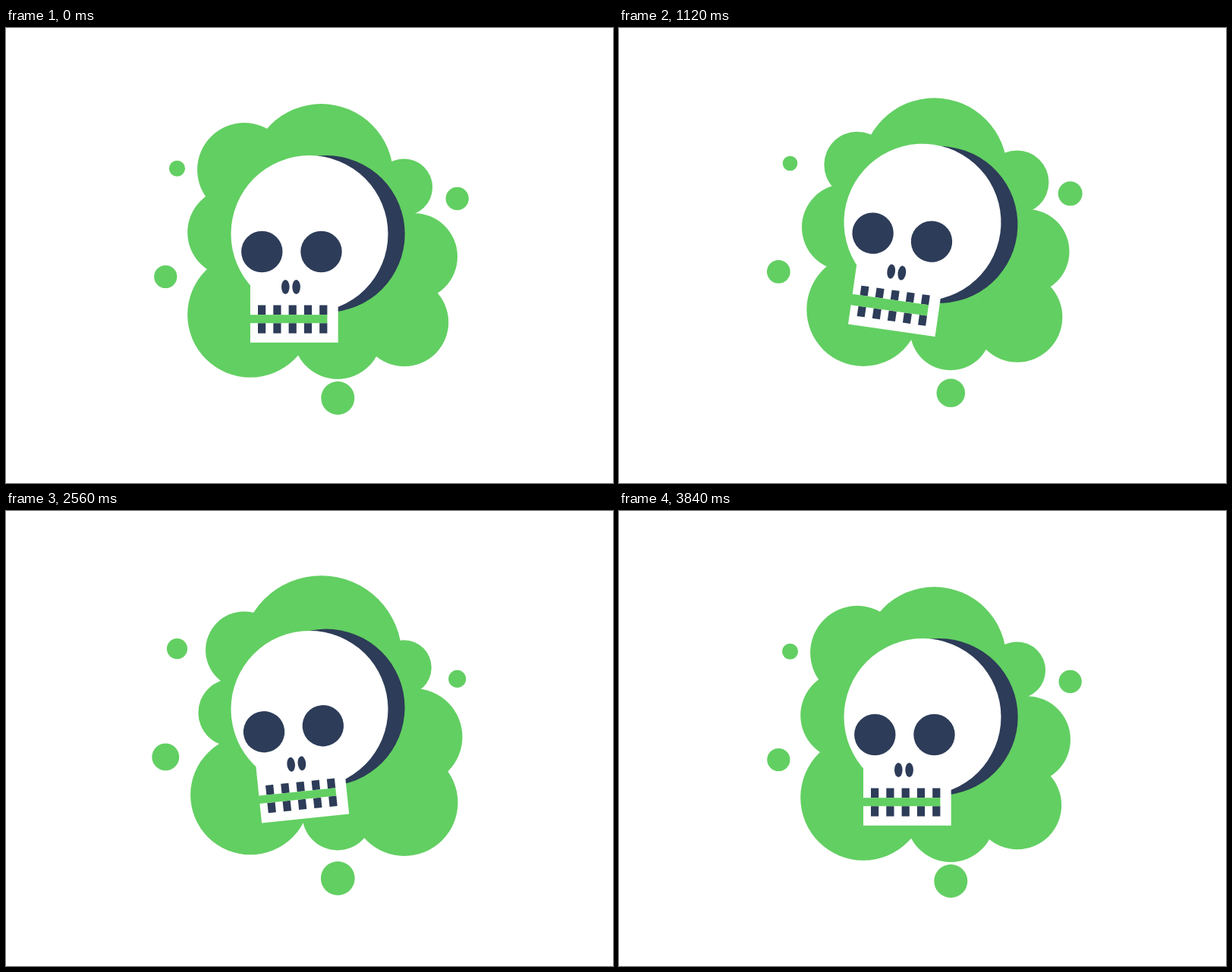
Animation, 800 px wide and 600 px high, one loop 3.88 s. Source, as an HTML page with a canvas:

```html
<!DOCTYPE html>
<html lang="en">
<head>
<meta charset="utf-8">
<title>Skull in a toxic cloud</title>
<style>
  html, body { margin: 0; width: 100%; height: 100%; overflow: hidden; background: #fff; }
  canvas { display: block; }
</style>
</head>
<body>
<canvas id="stage" width="800" height="600"></canvas>
<script>
const ctx = document.getElementById('stage').getContext('2d');
const GREEN = '#62cf62', DARK = '#2d3c58', WHITE = '#fff';
const STEP = 40, FRAMES = 97, BEAT = 48;

// Key poses of the skull, [time, value], eased in and out
const LIFT = [[0, 0], [25, -17.5], [46, 22.5], [73, -21.5], [96, 0]];
const TILT = [[0, 0], [16, -5.9], [25.5, 10.1], [38, -8.9], [48, 0]];
const GAP = [[0, 11], [8, 7], [25, 14.6], [39, 14.2], [48, 11]];

function ease(keys, t) {
  let i = 1;
  while (i < keys.length - 1 && t > keys[i][0]) i++;
  const [t0, a] = keys[i - 1], [t1, b] = keys[i];
  const u = (t - t0) / (t1 - t0);
  return a + (b - a) * u * u * (3 - 2 * u);
}

function oval(x, y, rx, ry, color) {
  ctx.fillStyle = color;
  ctx.beginPath();
  ctx.ellipse(x, y, rx, ry, 0, 0, Math.PI * 2);
  ctx.fill();
}

const disc = (x, y, r, color) => oval(x, y, r, r, color);

function box(x, y, w, h, color) {
  ctx.fillStyle = color;
  ctx.fillRect(x, y, w, h);
}

// A puff throbs twice per beat and breathes once
function puff(n, x, y, r, throb, breath = 0, lag = 0) {
  const a = (n - lag) / BEAT * Math.PI * 2;
  const size = r + throb * (0.6 * Math.sin(a) - Math.cos(2 * a)) + breath * Math.cos(a);
  disc(x, y, size, GREEN);
}

function drawCloud(n) {
  const a = n / (2 * BEAT) * Math.PI * 2;
  ctx.save();
  ctx.translate(0, 6 * Math.cos(2 * a) - 3.6 * Math.cos(a) - 2.4);
  disc(415, 280, 100, GREEN);

  puff(n, 314, 187, 53.9, 2, 10);
  puff(n, 298, 269.5, 54.4, 1.5, 8.6, -10);
  puff(n, 322, 378, 79.7, 1.4, 4.5);
  puff(n, 437, 404.5, 52, -4.3, 2.2);
  puff(n, 525, 388, 64.3, 6.1);
  puff(n, 537.7, 301.5, 60.2, 4.1, 1.2);
  puff(n, 524.5, 210, 37.6, -2.6, -2.6);
  puff(n, 415.5, 195, 100.5, 5.6);

  puff(n, 225.5, 185.2, 10.9, 0, 2.9, 13);
  puff(n, 594.7, 225, 14.7, 0, 3.4, -11);
  puff(n, 210.3, 328, 16.5, 1.4);
  puff(n, 437.3, 488, 21.7, 1.6, 1.9);
  ctx.restore();
}

// Coordinates are relative to the centre of the cranium
function drawSkull(n) {
  const beat = n % BEAT, gap = ease(GAP, beat);
  const lip = 106.7, lower = lip + gap;
  ctx.save();
  ctx.translate(400, 271.5 + ease(LIFT, n));
  ctx.rotate(ease(TILT, beat) * Math.PI / 180);
  disc(22.2, 0, 103.5, DARK);
  disc(0, 0, 103.5, WHITE);
  box(-78, 40, 115.7, lower + 25.6 - 40, WHITE);
  for (const x of [-62.7, 15.5]) disc(x, 23.5, 27.2, DARK);
  for (const x of [-31.7, -17.4]) oval(x, 70, 5.3, 9.5, DARK);
  for (let i = 0; i < 5; i++) {
    const x = -68 + i * 20.3;
    box(x, 94, 10.2, lip - 94, DARK);
    box(x, lower, 10.2, 13.4, DARK);
  }
  box(-78.4, lip, 101.8, gap, GREEN);
  ctx.restore();
}

function draw() {
  const n = Math.floor(performance.now() / STEP) % FRAMES;
  box(0, 0, 800, 600, WHITE);
  drawCloud(n);
  drawSkull(n);
  requestAnimationFrame(draw);
}
draw();
</script>
</body>
</html>
```
